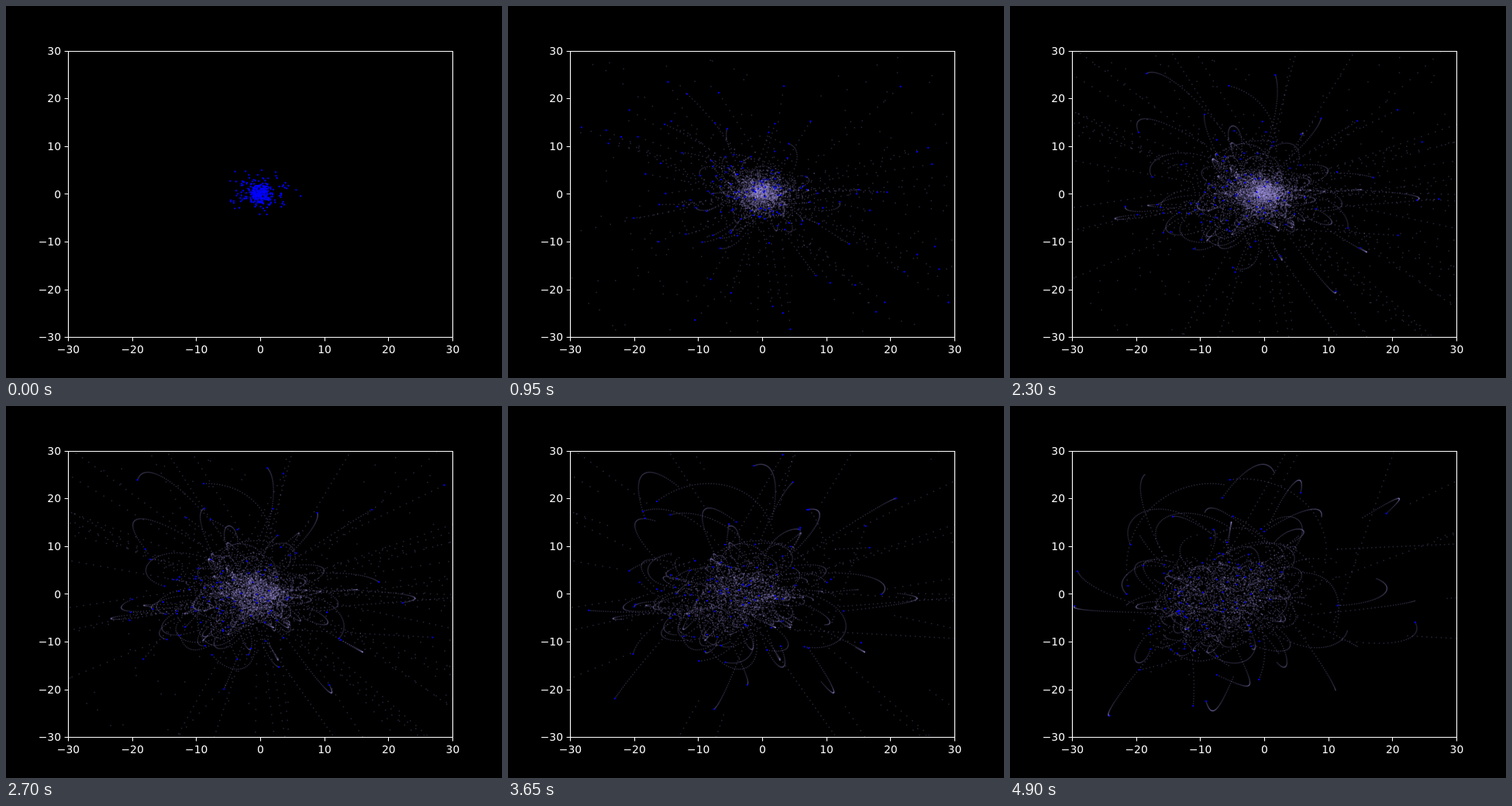
Animation of 640 by 480 pixels, one loop 4950 ms. Source, as an HTML page with a canvas:

```html
<!DOCTYPE html>
<html lang="en">
<head>
<meta charset="utf-8">
<title>Particle cluster</title>
<style>
  html, body { margin: 0; width: 100%; height: 100%; overflow: hidden; background: #000; }
  canvas, svg { position: absolute; left: 0; top: 0; width: 640px; height: 480px; display: block; }
  text { font: 13.89px "DejaVu Sans", sans-serif; fill: #fff; }
  path { fill: none; stroke: #fff; stroke-width: 1.11; }
</style>
</head>
<body>
<canvas id="plot" width="640" height="480"></canvas>
<svg id="axes" viewBox="0 0 640 480"></svg>
<script>
const FRAMES = 99, STEP = 50, TRAIL = 50, TAU = 2 * Math.PI;
const px = x => 328 + x * 8.26667;
const py = y => 242.4 - y * 6.16;

// Seeded random numbers
let seed = 20417;
function rnd() {
  seed = (seed + 0x6D2B79F5) | 0;
  let z = Math.imul(seed ^ (seed >>> 15), 1 | seed);
  z = (z + Math.imul(z ^ (z >>> 7), 61 | z)) ^ z;
  return ((z ^ (z >>> 14)) >>> 0) / 4294967296;
}
const range = (a, b) => a + (b - a) * rnd();
const expo = mean => -mean * Math.log(1 - rnd());
const gauss = () => Math.sqrt(expo(2)) * Math.cos(TAU * rnd());
const polar = (r, a) => [r * Math.cos(a), r * Math.sin(a)];

// The cluster drifts left and widens
const drift = f => -0.09 * Math.max(0, f - 12);
const spread = f => 0.9 + 0.05 * f;

// Jitter inside the core before a particle is thrown out
function makeCore() {
  const s = rnd() < 0.7 ? 1 : 2.5;
  const p = [gauss() * s, gauss() * s];
  const q = [gauss() * 1.6, gauss() * 1.6];
  const w = range(0.15, 0.4);
  return f => {
    const grow = 1 + f / 14, c = grow * Math.cos(w * f), n = grow * Math.sin(w * f);
    return [drift(f) + p[0] * c + q[0] * n, p[1] * c + q[1] * n];
  };
}

// Straight flight out of the core
function escaper(start, speed, angle) {
  const core = makeCore(), from = core(start);
  const [vx, vy] = polar(speed, angle);
  return f => {
    const d = f - start;
    return d <= 0 ? core(f) : [from[0] + vx * d, from[1] + vy * d];
  };
}

// One swing out to an apex and back
function swing(start, from, end, to, apex, width) {
  const ax = apex[0] - (from[0] + to[0]) / 2, ay = apex[1] - (from[1] + to[1]) / 2;
  const len = Math.hypot(ax, ay) || 1;
  return f => {
    const k = (f - start) / (end - start), u = 2 * k - 1;
    const q = Math.max(0, 1 - u * u);
    const out = Math.pow(q, 0.67), side = width * u * Math.sqrt(q) / len;
    return [
      from[0] + (to[0] - from[0]) * k + ax * out - ay * side,
      from[1] + (to[1] - from[1]) * k + ay * out + ax * side
    ];
  };
}

// Swing with a random apex around the drifting centre
function randomSwing(start) {
  const r = (2 + Math.min(20, expo(5.2))) * (1 + start / 180);
  const half = Math.max(7, 1.6 * r * range(0.8, 1.3));
  const [x, y] = polar(r, range(0, TAU));
  return { half, apex: [drift(start + half) + x, y], width: r * range(-0.5, 0.5) };
}

// Chain of swings; the first apex [x, y, step] may be given
function orbiter(key) {
  const core = makeCore(), legs = [];
  const launch = key ? Math.max(0, key[2] - 50) : range(0, 9);
  let start = launch, from = core(start);
  while (start < FRAMES) {
    const { half, apex, width } = key
      ? { half: key[2] - start, apex: key, width: range(0.4, 2.2) }
      : randomSwing(start);
    key = null;
    const end = start + 2 * half, s = spread(end);
    const to = [drift(end) + gauss() * s * 1.2, gauss() * s];
    legs.push({ end, at: swing(start, from, end, to, apex, width) });
    start = end;
    from = to;
  }
  return f => f <= launch ? core(f) : legs.find(l => f <= l.end).at(f);
}

// The longest swings
const keys = [
  [-18.4, 25.2, 46], [0.4, 27, 61], [-19.4, 15.5, 34], [24, -1.2, 44], [16, -12.2, 35],
  [11.2, -20.6, 44], [21, 20, 75], [-28.8, -3.2, 82], [-24.3, -25, 88], [8.6, 17.5, 60]
];

const movers = keys.map(k => orbiter(k));
const add = (count, make) => { for (let i = 0; i < count; i++) movers.push(make()); };
add(88, () => orbiter());
add(46, () => escaper(range(0, 6), range(0.9, 2.4), range(0, TAU)));
add(12, () => escaper(range(10, 65), range(0.6, 1.4), 0.4 + 0.7 * gauss()));
add(190, () => escaper(Math.min(24, expo(4.5)), range(10, 45), range(0, TAU)));

// Visible dots of every step
const inside = ([x, y]) => Math.abs(x) < 30 && Math.abs(y) < 30;
const steps = Array.from({ length: FRAMES }, (_, f) =>
  movers.map(m => m(f)).filter(inside).map(([x, y]) => [px(x), py(y)]));

const ctx = document.getElementById("plot").getContext("2d");

function draw(n) {
  ctx.fillStyle = "#000";
  ctx.fillRect(0, 0, 640, 480);
  ctx.save();
  ctx.beginPath();
  ctx.rect(81, 59, 495, 368);
  ctx.clip();
  ctx.fillStyle = "rgba(172,162,240,0.23)";
  for (let f = Math.max(0, n - TRAIL); f < n; f++)
    for (const [x, y] of steps[f]) ctx.fillRect(x - 0.75, y - 0.75, 1.5, 1.5);
  ctx.fillStyle = "#00f";
  ctx.beginPath();
  for (const [x, y] of steps[n]) {
    ctx.moveTo(x + 1.15, y);
    ctx.arc(x, y, 1.15, 0, TAU);
  }
  ctx.fill();
  ctx.restore();
}

function drawAxes() {
  let d = "M80.5 58.5H576.5V427.5H80.5Z", labels = "";
  for (let v = -30; v <= 30; v += 10) {
    const x = Math.round(px(v)) + 0.5, y = Math.round(py(v)) + 0.5;
    const s = String(v).replace("-", "\u2212");
    d += `M${x} 427.5v4.9M80.5 ${y}h-4.9`;
    labels += `<text x="${px(v) + 0.4}" y="448" text-anchor="middle">${s}</text>`;
    labels += `<text x="71" y="${Math.round(py(v) + 5.2)}" text-anchor="end">${s}</text>`;
  }
  document.getElementById("axes").innerHTML = `<path d="${d}"/>${labels}`;
}

drawAxes();
draw(0);
const begin = performance.now();
let shown = 0;
function tick() {
  const n = Math.floor((performance.now() - begin) / STEP) % FRAMES;
  if (n !== shown) draw(shown = n);
  requestAnimationFrame(tick);
}
requestAnimationFrame(tick);
</script>
</body>
</html>
```
